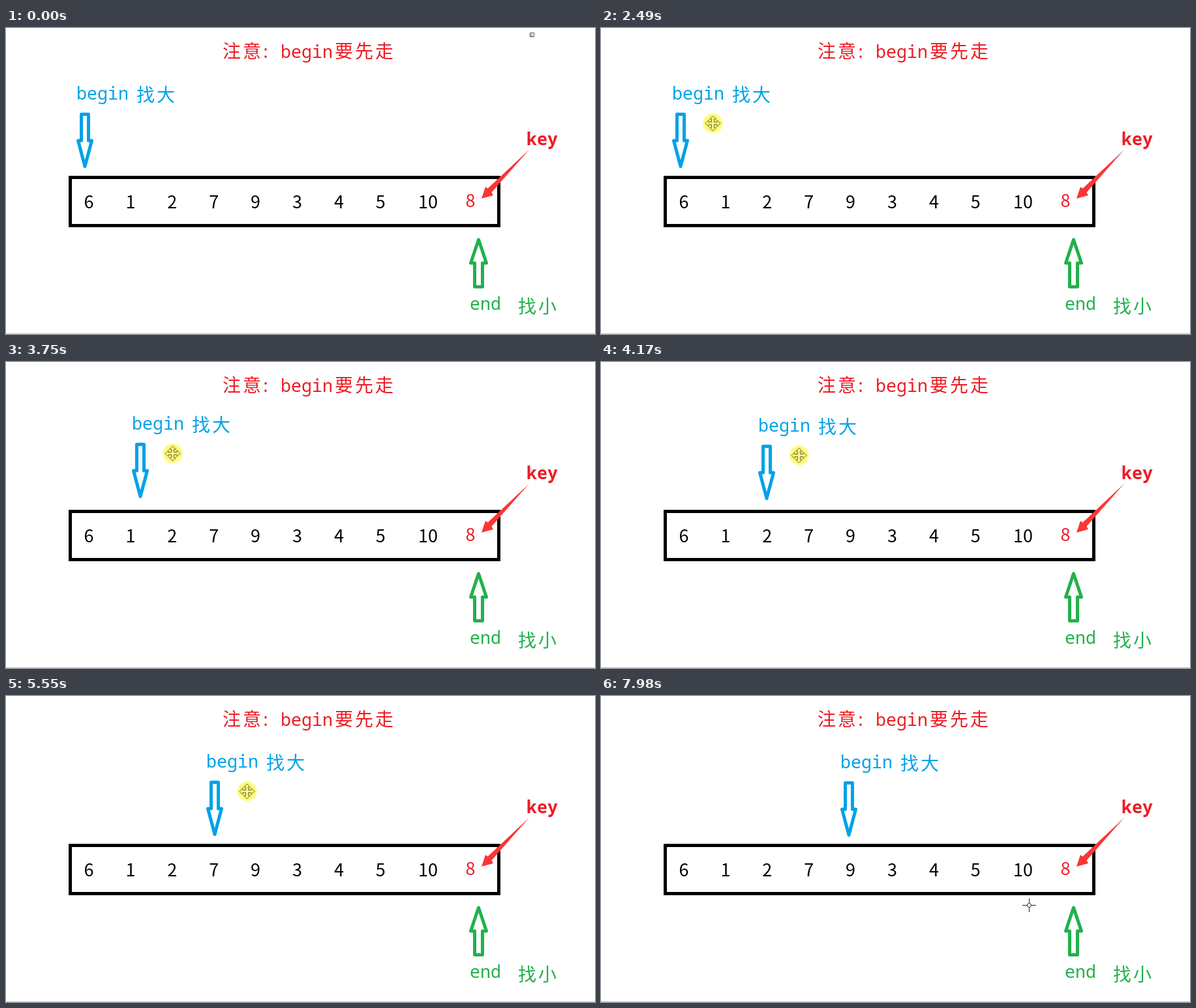
An HTML page with a canvas that plays this animation: 903 by 470 pixels, repeating every 8000 ms.

```html
<!DOCTYPE html>
<html lang="zh-CN">
<head>
<meta charset="utf-8">
<title>begin / end</title>
<style>
html, body { margin: 0; width: 100%; height: 100%; overflow: hidden; background: #fff; }
canvas { display: block; }
</style>
</head>
<body>
<canvas id="stage" width="903" height="470"></canvas>
<script>
const ctx = document.getElementById('stage').getContext('2d');
const LOOP = 8000, STEP = 30;
const BLUE = '#00a2e8', RED = '#ed1c24', GREEN = '#22b14c';
const MONO = '26.67px "Noto Sans Mono", "DejaVu Sans Mono", monospace';
const LATIN = '500 ' + MONO, STRONG = '600 ' + MONO;
const SANS = '"Noto Sans CJK SC", "Noto Sans CJK", "Noto Sans", sans-serif';
const DIGIT = '500 27px ' + SANS, HAN = '500 28px ' + SANS;

// Select an area, take hold of it, drop it, then click elsewhere
const SELECT = 810, SELECTED = 1740, HOLD = 2220, DROP = 7350, CLICK = 7680, CLICKED = 7770;
const ENTRY = { x: 822, y: 478 };
const AREA = { x: 56, y: 66, w: 219, h: 155 };
const GRAB = { x: 170, y: 146 };
const LIFT = 6;

const corner = { x: AREA.x, y: AREA.y };
const opposite = { x: AREA.x + AREA.w, y: AREA.y + AREA.h };
const dragged = (x, y) => ({ x: GRAB.x + x, y: GRAB.y + y });

const MOVES = [
  { from: 0, to: SELECT, goal: corner },
  { from: SELECT, to: 1230, goal: opposite },
  { from: SELECTED - STEP, to: 2070, goal: GRAB },
  { from: 2460, to: 3030, goal: dragged(64, 0) },
  { from: 3510, to: 4170, goal: dragged(133, -3) },
  { from: 4770, to: 5550, goal: dragged(199, 0) },
  { from: 5820, to: 6270, goal: dragged(254, -7) },
  { from: 6600, to: 6840, goal: dragged(259, 1) },
  { from: DROP, to: CLICK, goal: { x: 625, y: 375 } },
  { from: CLICKED - STEP, to: 7980, goal: { x: 656, y: 321 } }
];

const ease = p => p * p * (3 - 2 * p);
const between = (t, a, b) => t >= a && t < b;

function pointerAt(t) {
  let { x, y } = ENTRY;
  for (const { from, to, goal } of MOVES) {
    if (t <= from) break;
    const p = ease(Math.min(1, (t - from) / (to - from)));
    // Longer drags swing up a little on the way
    const lift = between(from, HOLD, DROP) && to - from > 300 ? LIFT : 0;
    x += (goal.x - x) * p;
    y += (goal.y - y) * p - lift * Math.sin(Math.PI * p);
  }
  return { x: Math.round(x), y: Math.round(y) };
}

function groupOffset(t) {
  if (t < HOLD) return { x: 0, y: 0 };
  const p = pointerAt(Math.min(t, DROP));
  return { x: p.x - GRAB.x, y: p.y - GRAB.y };
}

function label(text, x, y, color, font = LATIN, align = 'left') {
  ctx.font = font;
  ctx.textAlign = align;
  ctx.fillStyle = color;
  ctx.fillText(text, x, y);
}

// Each character is centred on its own column
function han(text, x, y, color) {
  [...text].forEach((c, i) => label(c, x + i * 31, y, color, HAN, 'center'));
}

function polygon(points) {
  ctx.beginPath();
  points.forEach(([x, y]) => ctx.lineTo(x, y));
  ctx.closePath();
}

function blockArrow(x, tip, shoulder, end, halfHead, halfShaft, color) {
  const right = [[halfHead, shoulder], [halfShaft, shoulder], [halfShaft, end]];
  const left = right.map(([dx, y]) => [-dx, y]).reverse();
  polygon([[0, tip], ...right, ...left].map(([dx, y]) => [x + dx, y]));
  ctx.lineWidth = 5;
  ctx.lineJoin = 'round';
  ctx.strokeStyle = color;
  ctx.stroke();
}

function drawScene() {
  ctx.fillStyle = '#fff';
  ctx.fillRect(0, 0, 903, 470);
  ctx.fillStyle = '#c3c3c3';
  ctx.fillRect(0, 469, 903, 1);

  han('注意', 346, 46, RED);
  label(':', 390, 46, RED);
  label('begin', 421, 46, RED);
  han('要先走', 518, 46, RED);

  ctx.lineWidth = 5;
  ctx.lineJoin = 'miter';
  ctx.strokeStyle = '#000';
  ctx.strokeRect(98.5, 229.5, 657, 74);
  [6, 1, 2, 7, 9, 3, 4, 5].forEach((n, i) =>
    label(n, 127 + i * 63.9, 277, '#000', DIGIT, 'center'));
  label('10', 647, 277, '#000', DIGIT, 'center');
  label('8', 712, 275, RED, DIGIT, 'center');

  label('key', 798, 180, RED, STRONG);
  polygon([[802, 187], [744.5, 252.5], [747, 257], [729, 262], [735, 244], [738.5, 246.5]]);
  ctx.fillStyle = '#fb3535';
  ctx.fill();

  blockArrow(724.5, 325, 361, 397.5, 12, 6, GREEN);
  label('end', 711, 433, GREEN);
  han('找小', 799, 438, GREEN);
}

function drawBegin({ x, y }) {
  ctx.save();
  ctx.translate(x, y);
  label('begin', 108, 110, BLUE);
  han('找大', 214, 113, BLUE);
  blockArrow(121, 212.5, 173, 132.5, 10.5, 5.5, BLUE);
  ctx.restore();
}

function drawCorner() {
  ctx.lineWidth = 1;
  ctx.strokeStyle = '#555';
  ctx.strokeRect(803.5, 7.5, 6, 6);
  ctx.strokeRect(803.5, 10.5, 3, 3);
}

function drawMarquee(x, y, w, h, handles) {
  ctx.lineWidth = 1;
  ctx.lineJoin = 'miter';
  ctx.strokeStyle = handles ? '#0078d7' : '#333';
  ctx.setLineDash([4, 4]);
  ctx.strokeRect(x + 0.5, y + 0.5, w, h);
  ctx.setLineDash([]);
  if (!handles) return;
  ctx.fillStyle = '#fff';
  ctx.strokeStyle = '#555';
  for (let i = 0; i < 9; i++) {
    if (i === 4) continue;
    const hx = x + Math.round(w * (i % 3) / 2) - 1.5;
    const hy = y + Math.round(h * Math.floor(i / 3) / 2) - 1.5;
    ctx.fillRect(hx, hy, 4, 4);
    ctx.strokeRect(hx, hy, 4, 4);
  }
}

function moveCursor() {
  const arm = [[2, -2], [2, -6.5], [5, -6.5], [0, -11.5], [-5, -6.5], [-2, -6.5]];
  const points = [];
  for (let i = 0; i < 4; i++) {
    const c = Math.cos(i * Math.PI / 2), s = -Math.sin(i * Math.PI / 2);
    arm.forEach(([x, y]) => points.push([x * c - y * s, x * s + y * c]));
  }
  polygon(points);
  ctx.fillStyle = '#fff';
  ctx.fill();
  ctx.stroke();
}

function crossCursor() {
  ctx.beginPath();
  for (const s of [-1, 1]) {
    ctx.moveTo(s * 3, 0); ctx.lineTo(s * 10.5, 0);
    ctx.moveTo(0, s * 3); ctx.lineTo(0, s * 10.5);
  }
  ctx.moveTo(3, 0);
  ctx.arc(0, 0, 3, 0, Math.PI * 2);
  ctx.stroke();
}

function drawPointer({ x, y }, moving, pressed) {
  ctx.save();
  ctx.translate(x + 0.5, y + 0.5);
  ctx.lineWidth = 1;
  ctx.lineJoin = 'miter';
  ctx.strokeStyle = moving ? '#666' : '#222';
  moving ? moveCursor() : crossCursor();
  if (pressed) {
    ctx.globalCompositeOperation = 'multiply';
    ctx.fillStyle = '#fffb7c';
    ctx.beginPath();
    ctx.arc(0, 0, 15, 0, Math.PI * 2);
    ctx.fill();
  }
  ctx.restore();
}

function render(t) {
  const pointer = pointerAt(t), shift = groupOffset(t);
  const x = AREA.x + shift.x, y = AREA.y + shift.y;
  const inside = pointer.x < x + AREA.w - 4 && pointer.y < y + AREA.h - 4;
  const selecting = between(t, SELECT + STEP, SELECTED);
  const selected = between(t, SELECTED, HOLD) || between(t, DROP, CLICK);
  const pressed = between(t, SELECT, SELECTED) || between(t, HOLD, DROP) || between(t, CLICK, CLICKED);

  drawScene();
  drawBegin(shift);
  if (t <= SELECT) drawCorner();
  if (selecting) drawMarquee(x, y, pointer.x - x, pointer.y - y, false);
  if (selected) drawMarquee(x, y, AREA.w, AREA.h, true);
  if (t > 0) drawPointer(pointer, between(t, SELECTED, CLICK) && inside, pressed);
}

const origin = performance.now();
function tick() {
  const t = (performance.now() - origin) % LOOP;
  render(Math.floor(t / STEP) * STEP);
  requestAnimationFrame(tick);
}
tick();
</script>
</body>
</html>
```
